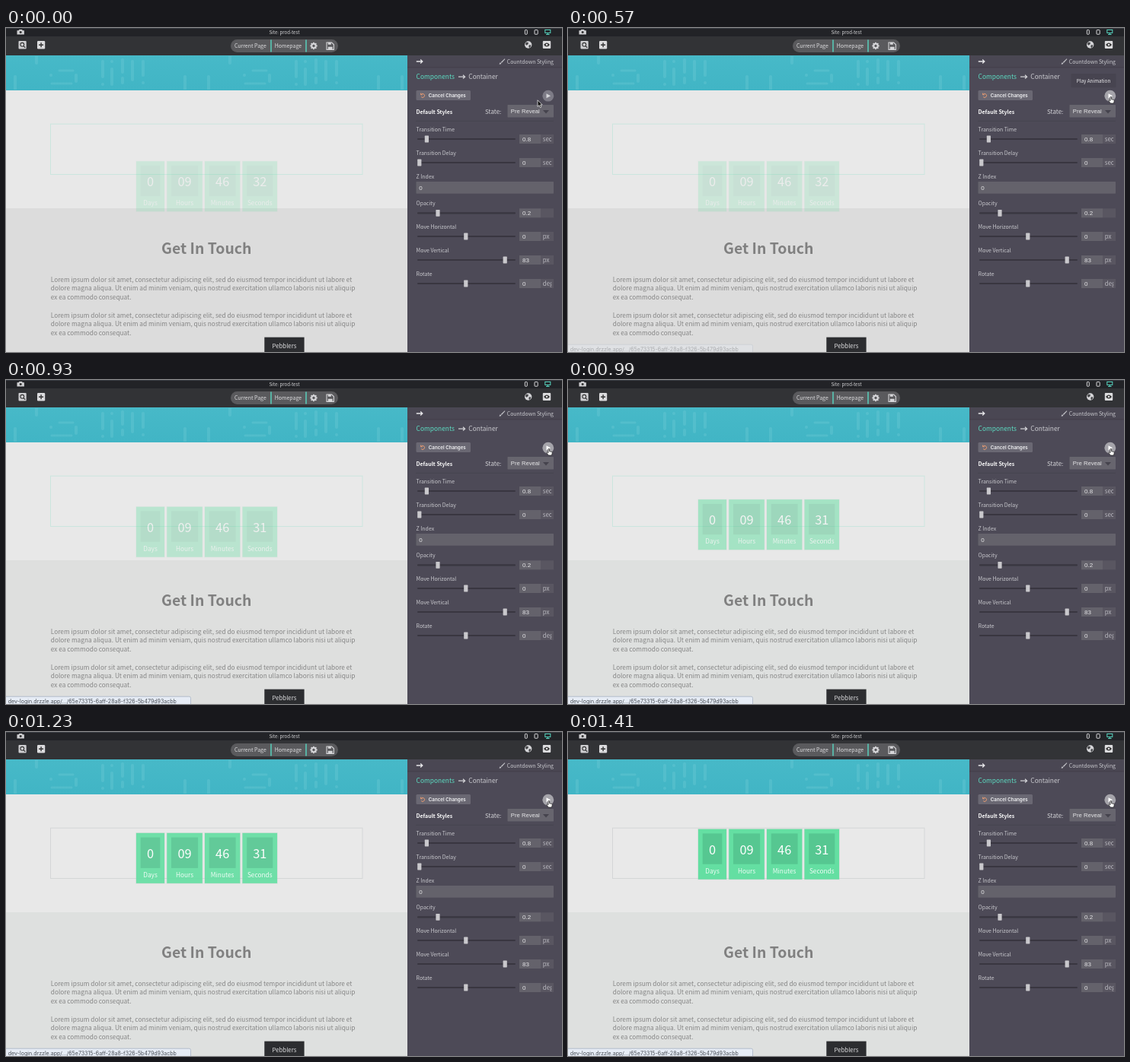
These frames come from a looping animation (730 by 426 pixels, 1440 ms). An HTML page:

```html
<!DOCTYPE html>
<html lang="en">
<head>
<meta charset="utf-8">
<title>Reveal preview</title>
<style>
html, body { margin: 0; width: 100%; height: 100%; overflow: hidden; background: #323336; }
svg { display: block; width: 730px; height: 426px; }
text { font-family: "Noto Sans CJK JP", "Noto Sans CJK SC", "Noto Sans", sans-serif; white-space: pre; }
.ui { font-family: Inter, sans-serif; }
.form { font-family: "Liberation Sans", Arial, sans-serif; }
</style>
</head>
<body>
<svg id="stage" viewBox="0 0 730 426" xmlns="http://www.w3.org/2000/svg">
  <defs>
    <clipPath id="bannerClip"><rect y="37" width="526" height="44"/></clipPath>
    <clipPath id="unitClip"><rect x="702" y="130" width="14.3" height="220"/></clipPath>
    <filter id="soft"><feGaussianBlur stdDeviation=".45"/></filter>
    <linearGradient id="teal" x2="0" y2="1">
      <stop stop-color="#47b9c8"/><stop offset="1" stop-color="#41b5c5"/>
    </linearGradient>
  </defs>
  <g id="page"></g>
  <g id="bar"></g>
  <g id="panel"></g>
  <g id="over"></g>
</svg>
<script>
const LOOP = 1440, STEP = 30;
const MINT = '#58d8c2', PALE = '#d5d5d8';
const $ = id => document.getElementById(id);
const page = $('page'), bar = $('bar'), panel = $('panel'), over = $('over');

function add(parent, tag, attrs) {
  const node = document.createElementNS('http://www.w3.org/2000/svg', tag);
  for (const k in attrs) node.setAttribute(k, attrs[k]);
  parent.appendChild(node);
  return node;
}
const group = (parent, attrs = {}) => add(parent, 'g', attrs);
const rect = (parent, x, y, width, height, fill, more) =>
  add(parent, 'rect', { x, y, width, height, fill, ...more });
const circle = (parent, cx, cy, r, fill, more) => add(parent, 'circle', { cx, cy, r, fill, ...more });
const path = (parent, d, fill, more) => add(parent, 'path', { d, fill, ...more });
const line = (parent, d, stroke, width = 1, more) =>
  path(parent, d, 'none', { stroke, 'stroke-width': width, ...more });
function text(parent, str, x, y, size, fill, more) {
  const node = add(parent, 'text', { x, y, 'font-size': size, fill, ...more });
  node.textContent = str;
  return node;
}
const MID = { 'text-anchor': 'middle' };

// Page: banner, frame, contact section
rect(page, 0, 36, 527, 390, '#e8e8e8');
rect(page, 0, 36, 527, 46, 'url(#teal)');
const motif = group(page, { 'clip-path': 'url(#bannerClip)', 'stroke-linecap': 'round', opacity: .28 });
const bars = [[12, 64, 84], [40, 36, 46], [92, 62, 70], [127, 44, 64], [139, 54, 74],
  [153, 42, 58], [153, 66, 72], [166, 44, 68], [180, 44, 62], [235, 64, 84]];
for (const shift of [0, 254, 508]) {
  for (const [x, a, b] of bars) line(motif, `M${x + shift} ${a}V${b}`, '#7ad0da', 4);
  for (const [x, y] of [[59, 62], [127, 74], [139, 44], [180, 72]])
    circle(motif, x + shift, y, 2, '#7ad0da');
  line(motif, `M${60 + shift} 73h26M${70 + shift} 56h18`, '#7ad0da', 3);
}
const section = rect(page, 0, 237, 527, 189, '#dcdcdc');
const frame = rect(page, 58.5, 126.2, 409.5, 66.3, '#e9e9e9', { 'stroke-width': 1 });

const copy = group(page, { filter: 'url(#soft)' });
text(copy, 'Get In Touch', 263.3, 297.3, 19.4, '#808080', { 'font-weight': 700, ...MID });
const lorem = [
  'Lorem ipsum dolor sit amet, consectetur adipiscing elit, sed do eiusmod tempor incididunt ut labore et',
  'dolore magna aliqua. Ut enim ad minim veniam, quis nostrud exercitation ullamco laboris nisi ut aliquip',
  'ex ea commodo consequat.'
];
for (const top of [333.6, 380.6])
  lorem.forEach((s, i) => text(copy, s, 58.8, top + i * 11.75, 8.3, '#858585'));

// Countdown cards, drawn at their resting place
const timer = group(page);
const cards = [[171, 37, 'Days', '0'], [211.3, 46.5, 'Hours', '09'],
  [261, 46.3, 'Minutes', '46'], [310.5, 45.5, 'Seconds', '32']];
const digits = cards.map(([x, w, label, value]) => {
  const mid = x + w / 2;
  rect(timer, x - .7, 126.6, w + 1.4, 67.2, '#9bbfae', { opacity: .35 });
  rect(timer, x, 127.2, w, 66, '#63dfa2');
  rect(timer, x + 5.7, 132.9, w - 11.4, 40.3, '#55c791');
  text(timer, label, mid, 185.3, 8.3, '#effdf6', { 'font-weight': 300, ...MID });
  return text(timer, value, mid, 160, 16.4, '#fff', { 'font-weight': 300, ...MID });
});

// Window bar and toolbar
rect(bar, 0, 0, 730, 11, '#222327');
rect(bar, 0, 0, 730, 1, '#3a3d43');
rect(bar, 0, 11, 730, 25, '#323336');
text(bar, 'Site: prod-test', 365.5, 8.3, 6.1, '#d8d8da', MID);
path(bar, 'M14.5 3.2h2l1-1.2h3.4l1 1.2h2v5.3h-9.4z', '#cfcfd2');
circle(bar, 19.2, 5.6, 1.5, '#333');
rect(bar, 681.3, 2.6, 3, 5.6, 'none', { stroke: PALE, rx: .6 });
rect(bar, 694, 2.6, 4.2, 5.6, 'none', { stroke: PALE, rx: .6 });
rect(bar, 707.8, 2.4, 7, 4, 'none', { stroke: MINT });
line(bar, 'M711.3 6.5v2M709 8.5h4.6', MINT);

rect(bar, 16.5, 17, 10.2, 10.6, '#cfcfd2', { rx: 1 });
circle(bar, 21.3, 21.8, 2.4, 'none', { stroke: '#333', 'stroke-width': 1.1 });
line(bar, 'M23 23.6l2.2 2.3', '#333', 1.3);
rect(bar, 41, 17, 10.2, 10.4, '#dcdcde', { rx: 1.2 });
line(bar, 'M46.1 19.2v6M43.1 22.2h6', '#333', 1.4);

rect(bar, 295, 15, 141, 17, '#5a5a5d', { rx: 8.5 });
text(bar, 'Current Page', 300, 26.4, 6.95, '#dedee0');
text(bar, 'Homepage', 352.8, 26.4, 6.95, '#dedee0');
line(bar, 'M348 15.5v16M394 15.5v16', MINT, 1.4);
circle(bar, 404, 23.5, 2.7, 'none', { stroke: PALE, 'stroke-width': 2 });
for (let i = 0; i < 8; i++)
  rect(bar, 403.1, 18.8, 1.8, 2, PALE, { transform: `rotate(${i * 45} 404 23.5)` });
path(bar, 'M421 19h6.6l2.8 2.8v6.6h-9.4z', 'none', { stroke: PALE, 'stroke-width': 1.1 });
rect(bar, 422.8, 19, 4, 2.8, PALE);
rect(bar, 422.8, 24.8, 5.8, 3.4, PALE);

circle(bar, 685.7, 22, 4.7, PALE);
path(bar, 'M683 18.6l3 .6-.6 2.2-2 1.4-1.6-1.6zM687 22.2l2.4.4-1 2.8-1.4.6-.8-2z', '#454649');
rect(bar, 704.8, 17, 10.4, 10, '#dcdcde', { rx: 1 });
path(bar, 'M706 22q4-5 8 0q-4 5-8 0z', '#333');
circle(bar, 710, 22, 1.3, '#dcdcde');

// Styling panel
rect(panel, 527, 36, 203, 390, '#4d4a57');
rect(panel, 527, 36, 203, 16, '#4a4753');
rect(panel, 527, 51.5, 203, .8, '#403d48');
const arrow = (x, y, w, color) =>
  line(panel, `M${x} ${y}h${w}m-2.6 -2.4l2.6 2.4l-2.6 2.4`, color, 1.3);
arrow(538.8, 44, 8, '#e8e8ea');
path(panel, 'M654.8 40.3l-5 4.6 1 1 4.6-5zM649 45.2l1.4 1.4c-.6 1.2-2 1.3-3.2 1 .8-.5.8-1.8 1.8-2.4z', '#c3c3c8');
text(panel, 'Countdown Styling', 719, 46.6, 6.9, '#c9c9ce', { 'text-anchor': 'end' });
text(panel, 'Components', 538.6, 67.4, 8.4, '#5cdcc2');
arrow(594, 64.2, 8.6, '#d0d0d4');
text(panel, 'Container', 607.3, 67.4, 8.4, '#cbcbd0');

rect(panel, 538.5, 82, 71.5, 13, '#6a6873', { rx: 1.5 });
line(panel, 'M545 87.4a2.5 2.5 0 1 1 .2 3.2M544.6 85.6v2.2h2.2', '#e59a72', 1);
text(panel, 'Cancel Changes', 554.8, 91, 6.2, '#f2f2f4', { class: 'ui', 'font-weight': 600 });
const play = circle(panel, 711.8, 89.2, 7.4, '#7d7b86');
const playMark = path(panel, 'M709.5 86.2l5.6 3-5.6 3z', '#d6d6da');

text(panel, 'Default Styles', 538.6, 113.2, 7, '#fafafa', { 'font-weight': 700 });
text(panel, 'State:', 629, 113.4, 8, '#d3d3d7');
rect(panel, 658.5, 101, 60.5, 16.5, '#67656e', { rx: .8 });
text(panel, 'Pre Reveal', 662.8, 112, 7.7, '#e6e6e8', { class: 'form' });
path(panel, 'M705 108h8l-4 4.4z', '#45434d');
line(panel, 'M538.5 122.3H719', '#3f3c47', 1, { 'stroke-dasharray': '1 1' });

const label = (str, y) => text(panel, str, 538.6, y, 6.94, '#c9c9ce');
const units = group(panel, { 'clip-path': 'url(#unitClip)' });
function slider(name, y, knob, value, unit) {
  label(name, y - 10.3);
  rect(panel, 540, y - 1.1, 129, 2.2, '#393640', { rx: 1 });
  rect(panel, knob - 2.6, y - 4.4, 5.2, 8.8, '#c9c8cc', { rx: .6 });
  rect(panel, 674, y - 6, 28, 12, '#64626b');
  rect(panel, 702, y - 6, 17, 12, '#595661');
  text(panel, value, 678, y + 2.9, 8, '#e4e4e6', { class: 'form' });
  text(units, unit, 704.8, y + 2.5, 7.9, '#b9b8bf');
}
slider('Transition Time', 146, 552.4, '0.8', 'sec');
slider('Transition Delay', 177, 542.8, '0', 'sec');
label('Z Index', 198);
rect(panel, 538.5, 202, 180.5, 15.8, '#64626b', { rx: .8 });
text(panel, '0', 542.3, 212.8, 8, '#e4e4e6', { class: 'form' });
slider('Opacity', 243.3, 567, '0.2', '');
slider('Move Horizontal', 274, 603.8, '0', 'px');
slider('Move Vertical', 305, 655.2, '83', 'px');
slider('Rotate', 336, 603.8, '0', 'deg');
panel.appendChild(units);

// Overlays
rect(over, 339.3, 406.6, 52.3, 20, '#2c2d30');
text(over, 'Pebblers', 365.4, 420.6, 7.8, '#dcdcde', MID);

const tip = group(over);
rect(tip, 660.5, 60, 59, 18.3, '#474450', { rx: 1 });
text(tip, 'Play Animation', 690, 71.8, 6.3, '#eeeef0', MID);

const status = group(over);
rect(status, -2, 416.2, 244.5, 12, '#e6ecf5', { rx: 2, stroke: '#a9b4c6', 'stroke-width': .8 });
text(status, 'dev-login.drzzle.app/.../65e73315-6aff-28a8-f326-5b479d93acbb', 2.8, 424.8, 7.05, '#4b5058', { class: 'ui' });

const pointer = path(over, 'M0 0v8.6l2-1.8 1.4 3 1.5-.7-1.4-2.9h2.7z', '#111', { stroke: '#fff', 'stroke-width': .7 });
const hand = path(over,
  'M0 .4q.9-.8 1.5.2v3l2.8.6q1 .3.9 1.3l-.7 3.3h-4.2l-2.6-3.4q.1-1 1.2-.6l1.1.8z',
  '#fff', { stroke: '#222', 'stroke-width': .7 });

// Motion
const clamp = v => Math.min(1, Math.max(0, v));
const ramp = (t, a, b) => clamp((t - a) / (b - a));
const mix = (a, b, p) => a + (b - a) * p;
const bez = (a, b, u) => 3 * a * u * (1 - u) ** 2 + 3 * b * u * u * (1 - u) + u ** 3;
function ease(x) {
  let lo = 0, hi = 1;
  for (let i = 0; i < 24; i++) {
    const m = (lo + hi) / 2;
    if (bez(.25, .25, m) < x) lo = m; else hi = m;
  }
  return bez(.1, 1, lo);
}
const rgb = (a, b, p) => `rgb(${a.map((v, i) => Math.round(mix(v, b[i], p)))})`;

function draw(t) {
  const p = ease(ramp(t, 833, 1500));
  timer.setAttribute('transform', `translate(0 ${mix(48, 0, p).toFixed(2)})`);
  timer.setAttribute('opacity', mix(.21, 1, p));
  digits[3].textContent = t < 840 ? '32' : '31';

  frame.setAttribute('stroke', rgb([203, 229, 222], [212, 214, 215], ramp(t, 1000, 1200)));
  section.setAttribute('fill', rgb([220, 220, 220], [222, 224, 223], ramp(t, 840, 960)));

  const go = ramp(t, 0, 210), hover = t >= 150;
  const x = mix(698, 712, go), y = mix(94.8, 90.2, go);
  pointer.setAttribute('transform', `translate(${x} ${y})`);
  hand.setAttribute('transform', `translate(${x} ${y})`);
  pointer.setAttribute('opacity', hover ? 0 : 1);
  hand.setAttribute('opacity', hover ? 1 : 0);
  play.setAttribute('fill', hover ? '#a5a4aa' : '#7d7b86');
  playMark.setAttribute('fill', hover ? '#fff' : '#d6d6da');

  tip.setAttribute('opacity', ramp(t, 150, 240) * (1 - ramp(t, 840, 930)));
  status.setAttribute('opacity', ramp(t, 525, 660));
}

function tick() {
  draw(Math.floor(performance.now() % LOOP / STEP) * STEP);
  requestAnimationFrame(tick);
}
tick();
</script>
</body>
</html>
```
